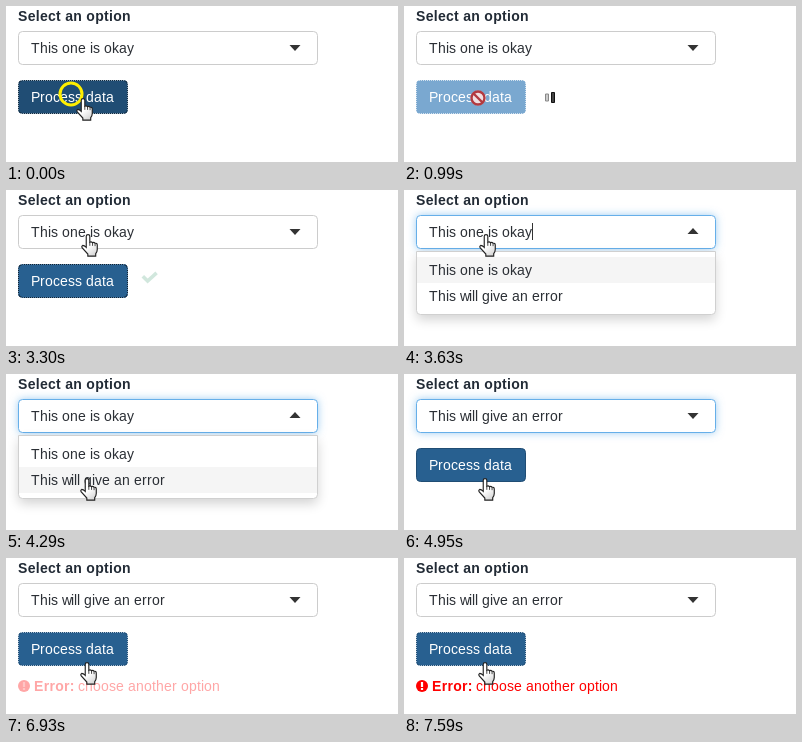
An HTML page with a canvas for the animation above (8000 ms loop, 392x156 px).

```html
<!DOCTYPE html>
<html lang="en">
<head>
<meta charset="utf-8">
<title>Process data</title>
<style>
html, body { margin: 0; width: 100%; height: 100%; overflow: hidden; background: #fff; }
canvas { display: block; }
</style>
</head>
<body>
<canvas id="stage" width="392" height="156"></canvas>
<script>
const ctx = document.getElementById('stage').getContext('2d');
const LOOP = 8000;
const FONT = '14px "Liberation Sans", Arial, sans-serif';
const OKAY = 'This one is okay';
const FAIL = 'This will give an error';
const INK = '#2b2f35';

const HAND = new Path2D('M5 13V2.3a1.7 1.7 0 0 1 3.4 0V8q1.4-1 2.6.4 1.4-.8 2.4.6 2-.4 2.1 1.7V15q0 2-1.5 4v2.5H6.5v-2L1.2 13.5q-1-1.6.4-2.4Q3 11 5 13z');
const FINGER_LINES = new Path2D('M8.4 8v3.5M11 8.5v3M13.4 9.2v2.6');

// Value of the last [time, value] step that has been reached.
function at(steps, t) {
  let value = steps[0][1];
  for (const [start, v] of steps) if (t >= start) value = v;
  return value;
}

const POINTER = [
  [0, ['hand', 70, 92]], [330, ['blocked', 74, 92]], [1320, ['hand', 70, 92]],
  [2310, ['hand', 71, 91]], [2640, ['hand', 75, 56]], [2970, ['hand', 75, 44]],
  [3960, ['hand', 73, 103]], [4290, ['hand', 74, 104]],
  [5940, ['busy', 77, 104]], [6930, ['hand', 74, 104]]
];
const BUTTON = [
  [0, 'active'], [330, 'disabled'], [1320, 'focusHover'], [2640, 'focus'],
  [4620, 'hover'], [5940, 'disabled'], [6930, 'focusHover']
];
const RING = [[0, [65, 88]], [330, null], [4620, [68.5, 99.5]], [4950, null]];
const LOADER = [
  [0, ''], [330, 'lll'], [660, 'llt'], [990, ' mB'], [1320, ''],
  [5940, 'llt'], [6270, ' mB'], [6600, 'Bml'], [6930, '']
];
const CHECK = [[0, 0], [1320, 1], [2970, 0.6], [3300, 0.2], [3630, 0]];
const ERROR = [[0, 0], [6930, 0.35], [7260, 0.75], [7590, 1]];

// Regular glyphs advance by whole pixels, at most 9, like hinted screen text;
// bold glyphs are set slightly loose.
function text(str, x, y, color, bold) {
  ctx.font = (bold ? 'bold ' : '') + FONT;
  ctx.fillStyle = color;
  for (const ch of str) {
    ctx.fillText(ch, x, y);
    const { width } = ctx.measureText(ch);
    x += bold ? width + 0.3 : Math.min(9, Math.round(width));
  }
  return x;
}

function box(x, y, w, h, r, fill, stroke) {
  ctx.beginPath();
  ctx.roundRect(x, y, w, h, r);
  if (fill) { ctx.fillStyle = fill; ctx.fill(); }
  if (stroke) { ctx.shadowColor = 'transparent'; ctx.strokeStyle = stroke; ctx.lineWidth = 1; ctx.stroke(); }
}

function line(points, color, width) {
  ctx.beginPath();
  points.forEach(([x, y]) => ctx.lineTo(x, y));
  ctx.strokeStyle = color;
  ctx.lineWidth = width;
  ctx.stroke();
}

function arc(x, y, r, color, width, from = 0, to = 2 * Math.PI) {
  ctx.beginPath();
  ctx.arc(x, y, r, from, to);
  ctx.strokeStyle = color;
  ctx.lineWidth = width;
  ctx.stroke();
}

function shadow(color, blur, dy) {
  ctx.shadowColor = color;
  ctx.shadowBlur = blur;
  ctx.shadowOffsetY = dy;
}

function drawSelect(value, focused, open) {
  ctx.save();
  if (focused) shadow('rgba(102,175,233,.7)', 8, 0);
  box(12.5, 25.5, 299, 33, 4, '#fff', focused ? '#66afe9' : '#ccc');
  ctx.restore();
  text(value, 25, 47, INK);
  const [base, tip] = open ? [44, 38] : [39, 45];
  ctx.beginPath();
  ctx.moveTo(283.5, base);
  ctx.lineTo(294.5, base);
  ctx.lineTo(289, tip);
  ctx.fillStyle = '#333';
  ctx.fill();
}

function drawMenu(active) {
  ctx.save();
  shadow('rgba(0,0,0,.18)', 12, 5);
  box(12.5, 61.5, 299, 63, [0, 0, 4, 4], '#fff', '#d0d0d0');
  ctx.restore();
  [OKAY, FAIL].forEach((label, i) => {
    if (i === active) {
      ctx.fillStyle = '#f5f5f5';
      ctx.fillRect(13, 67 + 26 * i, 298, 26);
    }
    text(label, 25, 85 + 26 * i, INK);
  });
}

// One-pixel dots on every second pixel of the button's edge.
function dotEdge(color) {
  ctx.fillStyle = color;
  for (let x = 15; x < 120; x += 2) {
    ctx.fillRect(x, 74, 1, 1);
    ctx.fillRect(x, 107, 1, 1);
  }
  for (let y = 77; y < 106; y += 2) {
    ctx.fillRect(12, y, 1, 1);
    ctx.fillRect(121, y, 1, 1);
  }
}

function drawButton(state) {
  const [fill, edge, dots] = {
    active: ['#204d74', '#122b40', '#8fa6b9'],
    disabled: ['#7aa8d0', '#7aa8d0', '#d3e2ef'],
    focus: ['#286090', '#0e2233', '#5b86ad'],
    focusHover: ['#286090', '#204d74', '#a9c1d6'],
    hover: ['#286090', '#204d74', null]
  }[state];
  box(12.5, 74.5, 109, 33, 4, fill, edge);
  if (dots) dotEdge(dots);
  text('Process data', 25, 96, '#fff');
}

function drawLoader(bars) {
  const looks = {
    l: ['#fff', '#c4c8c6', 7], m: ['#ccc', '#888', 8],
    t: ['#8fb5b5', '#6f9c9c', 7], B: ['#444', '#111', 11]
  };
  [...bars].forEach((kind, i) => {
    if (kind === ' ') return;
    const [fill, edge, h] = looks[kind];
    box(135.5 + 6 * i, 91.5 - (h - 1) / 2, 3, h - 1, 0, fill, edge);
  });
}

function drawError(alpha) {
  ctx.globalAlpha = alpha;
  ctx.fillStyle = '#f00';
  ctx.beginPath();
  ctx.arc(18, 128, 6, 0, 2 * Math.PI);
  ctx.fill();
  line([[18, 124], [18, 129]], '#fff', 2.2);
  line([[18, 130], [18, 132]], '#fff', 2.2);
  const x = text('Error:', 28, 133, '#f00', true);
  text(' choose another option', Math.floor(x), 133, '#f00');
  ctx.globalAlpha = 1;
}

function drawHand() {
  const shade = ctx.createLinearGradient(4, 8, 15, 22);
  shade.addColorStop(0.3, '#fff');
  shade.addColorStop(1, '#ccc');
  ctx.scale(1.05, 1.03);
  ctx.fillStyle = shade;
  ctx.fill(HAND);
  ctx.strokeStyle = '#222';
  ctx.lineWidth = 1.1;
  ctx.stroke(HAND);
  ctx.lineWidth = 0.8;
  ctx.stroke(FINGER_LINES);
}

function drawBlocked(busy) {
  ctx.beginPath();
  ctx.arc(0, 0, 7.5, 0, 2 * Math.PI);
  ctx.fillStyle = busy ? '#f4f4f2' : '#f1dfe2';
  ctx.fill();
  const color = busy ? '#a9aca9' : '#b23a40';
  arc(0, 0, 6.5, color, 2.4);
  if (busy) arc(0, 0, 6.5, '#3fbf4c', 2.4, 1.6, 3.7);
  line([[-4.5, -4.5], [4.5, 4.5]], color, 2.4);
}

function drawPointer([kind, x, y]) {
  ctx.save();
  ctx.translate(x, y);
  if (kind === 'hand') drawHand();
  else drawBlocked(kind === 'busy');
  ctx.restore();
}

function draw(t) {
  ctx.fillStyle = '#fff';
  ctx.fillRect(0, 0, 392, 156);

  const open = t >= 3630 && t < 4620;
  const focused = t >= 3630 && t < 5940;
  text('Select an option', 12, 15, '#222b36', true);
  drawSelect(t < 4620 ? OKAY : FAIL, focused, open);
  if (t >= 3630 && t < 4290) line([[128.5, 33], [128.5, 50]], '#333', 1);

  drawButton(at(BUTTON, t));
  drawLoader(at(LOADER, t));

  ctx.globalAlpha = at(CHECK, t);
  line([[136.8, 86.2], [141.6, 91], [150.6, 82.8]], '#1a8656', 3.6);
  ctx.globalAlpha = 1;

  drawError(at(ERROR, t));
  if (open) drawMenu(t < 3960 ? 0 : 1);

  const ring = at(RING, t);
  if (ring) arc(ring[0], ring[1], 11, '#ffee00', 3);
  drawPointer(at(POINTER, t));
}

const start = performance.now();
function tick() {
  draw((performance.now() - start) % LOOP);
  requestAnimationFrame(tick);
}
tick();
</script>
</body>
</html>
```
